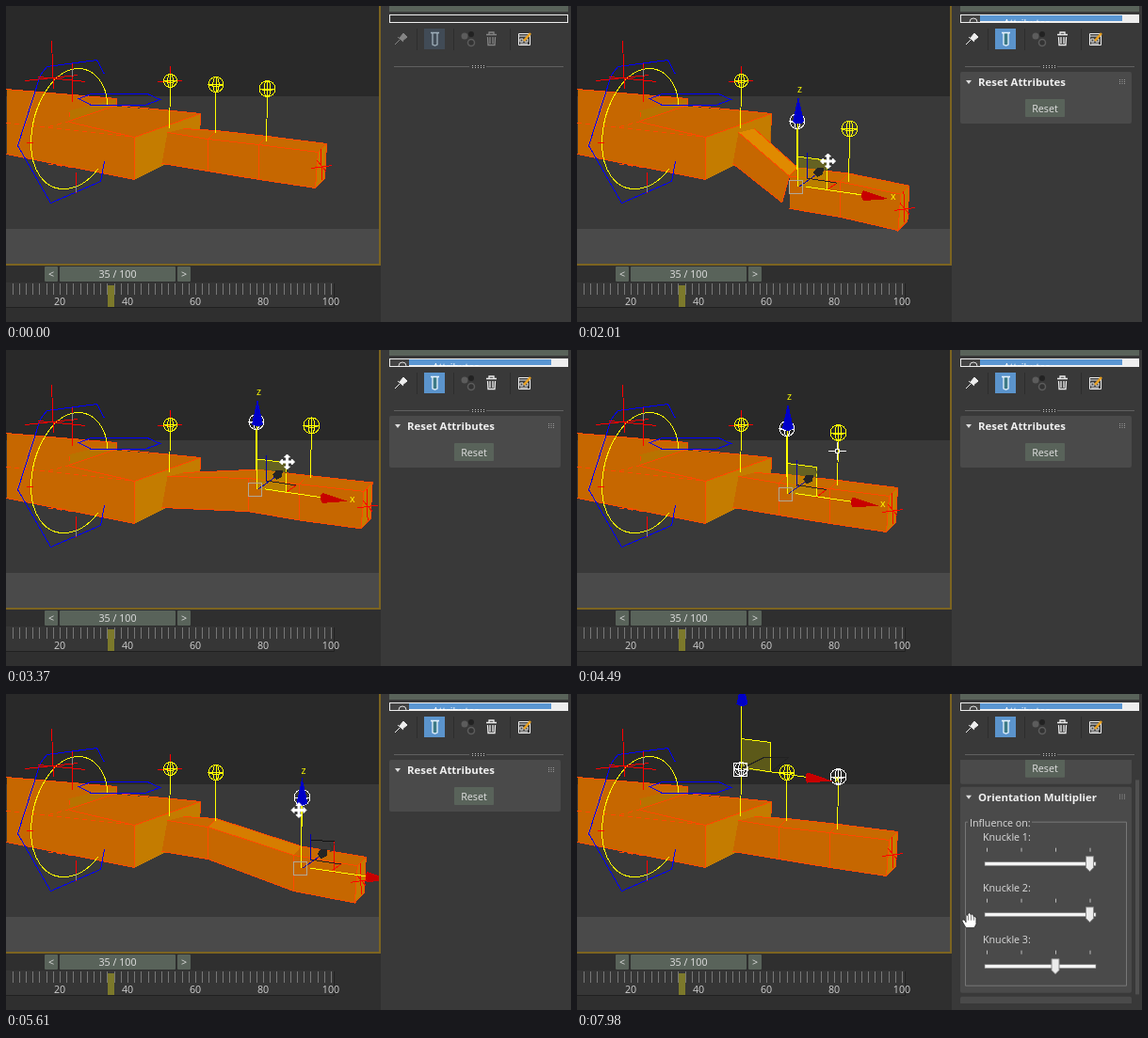
An HTML page that plays this animation: 600 px wide and 336 px high, repeating every 8 s.

```html
<!DOCTYPE html>
<html lang="en">
<head>
<meta charset="utf-8">
<title>Finger rig</title>
<style>
html, body { margin: 0; width: 100%; height: 100%; overflow: hidden; background: #393939; }
svg { display: block; width: 600px; height: 336px; font: 10.7px "Open Sans", "Noto Sans", sans-serif; }
svg svg { width: auto; height: auto; }
.title { font-size: 11.4px; font-weight: 700; fill: #f0f0f0; }
</style>
</head>
<body>
<svg id="stage" viewBox="0 0 600 336"></svg>
<script>
const LOOP = 8000, STEP = 40;
const YELLOW = '#ffff00', RED = '#ff0000', BLUE = '#0000ff', EDGE = '#ff4a00';
const FRONT = '#c66700', END = '#c47c00', BUTTON = '#59635a';

// Timing of selections and drags, in ms
const PICK2 = 1410, DRAG2 = 1890, UNDO2 = 3770, PICK3 = 4690, DRAG3 = 4810, UNDO3 = 6170, PICK1 = 6490, PAN = 7540;

// Keys: time, x, y
const move2 = [[DRAG2, 0, 0], [2010, 11, 39], [2130, 30, 72], [2290, 62, 34], [2450, 30, -12], [2610, -4, -22],
  [2730, -8, -27], [2850, 0, 12], [3010, 20, 46], [3210, 52, 18], [3370, 43, -7]];
const move3 = [[DRAG3, 0, 0], [4970, -20, 20], [5130, -15, 56], [5290, 30, 52], [5450, 38, 42], [5610, 37, 22],
  [5770, 22, 58], [5930, -18, 28], [6090, 4, -4]];
const pointer = [[250, 101, 274], [490, 190, 190], [730, 328, 172], [1010, 265, 112], [1290, 223, 84], [1450, 223, 84],
  [1850, 255, 126], [UNDO2, 296, 120], [4130, 285, 118], [4490, 276, 107], [4610, 277, 89], [PICK3, 277, 89],
  [4790, 274, 102], [UNDO3, 274, 102], [6450, 174, 79], [7180, 174, 79], [PAN, 417, 270], [7980, 417, 240]];

function at(keys, t) {
  if (t <= keys[0][0]) return keys[0].slice(1);
  for (let i = 1; i < keys.length; i++) {
    const [t0, x0, y0] = keys[i - 1], [t1, x1, y1] = keys[i];
    if (t <= t1) {
      const k = (t - t0) / (t1 - t0);
      return [x0 + (x1 - x0) * k, y0 + (y1 - y0) * k];
    }
  }
  return keys[keys.length - 1].slice(1);
}

const add = (a, b, k = 1) => [a[0] + b[0] * k, a[1] + b[1] * k];
// Parts moved to the right come nearer to the camera, so their heights grow.
const depthScale = dx => 1 + dx * .0008;
const shift = ([x, y], d) => [x + d[0], 83 + (y - 83) * depthScale(d[0]) + d[1]];
const rect = (x, y, w, h, fill, extra = '') => `<rect x="${x}" y="${y}" width="${w}" height="${h}" fill="${fill}" ${extra}/>`;
const frame = (x, y, w, h, stroke) => rect(x + .5, y + .5, w - 1, h - 1, 'none', `stroke="${stroke}"`);
const path = (d, stroke, fill = 'none', extra = '') => `<path d="${d}" fill="${fill}" stroke="${stroke}" ${extra}/>`;
const poly = (pts, fill, stroke = 'none') => path(`M${pts.join('L')}Z`, stroke, fill);
const text = (x, y, s, fill = '#dcdcdc', extra = '') => `<text x="${x}" y="${y}" fill="${fill}" ${extra}>${s}</text>`;
const centered = (x, y, s, fill) => text(x, y, s, fill, 'text-anchor="middle"');
const group = (x, y, body, extra = '') => `<g transform="translate(${x} ${y})" ${extra}>${body}</g>`;
const clip = (x, y, w, h, body) =>
  `<svg x="${x}" y="${y}" width="${w}" height="${h}" viewBox="${x} ${y} ${w} ${h}" style="width:${w}px;height:${h}px">${body}</svg>`;
const button = (x, y, w, h, label) => rect(x, y, w, h, BUTTON, 'rx="1"') + centered(x + w / 2, y + h / 2 + 4, label, '#e0e0e0');

const backdrop = rect(0, 0, 398, 96, '#292929') + rect(0, 96, 398, 141, '#393939') + rect(0, 237, 398, 38, '#4a4a4a');

const arm =
  poly([[0, 88], [117, 98], [117, 106], [206, 114], [205, 150], [136, 184], [0, 157]], FRONT) +
  poly([[66, 111], [117, 98], [117, 105], [66, 122]], '#b87300') +
  poly([[136, 139], [206, 114], [204, 151], [136, 184]], END) +
  path('M0 88L117 98V105L206 114L136 139L67 123M66 122L117 105M0 157L136 184V139M206 114V126', EDGE) +
  path('M0 124L136 139M45 128L67 122V110M45 168L70 171', EDGE, 'none', 'stroke-dasharray="5 4"');

const wristControls =
  path('M104 72L96 57L43 64L36 73L12 148L47 209L100 186L104 165', BLUE) +
  path('M77 98L90 93H150L163 99L147 105H90Z', BLUE) +
  path('M107 104C107 84 94 66 77 66C50 66 27 104 26 145C26 175 41 194 60 194C75 194 88 185 97 173', YELLOW) +
  path('M48 37L50 88M20 79L76 73M34 75L84 80M70 60V101M21 145H28M74 176V198', RED) +
  path('M70 66V74M74 190V197', '#888');

function timeline() {
  let s = rect(0, 276, 398, 60, '#2f2f2f') + rect(0, 294, 348, 27, '#363636') +
    button(41, 277, 14, 16, '&lt;') + button(57, 277, 123, 16, '35 / 100') + button(182, 277, 14, 16, '&gt;') +
    path('M0 320.5H348.5V295', '#202020');
  for (let n = 4; n <= 100; n += 2) {
    const x = Math.round(345 - (100 - n) * 3.6) + .5;
    s += path(`M${x} 295V307`, '#777');
  }
  for (let n = 20; n <= 100; n += 20) s += centered(345 - (100 - n) * 3.6, 318, n, '#d0d0d0');
  return s + rect(108, 297, 7, 23, '#7c792b');
}

function segment(a, b) {
  const slope = (b.front[1] - a.front[1]) / Math.max(20, b.front[0] - a.front[0]);
  const k = Math.max(0, Math.min(1, (slope - .18) * 4));
  const top = `rgb(${200 + 24 * k},${106 + 32 * k},0)`;
  const low = add(b.low, [-17, -14], Math.max(0, Math.min(.6, slope - .4)));
  return poly([a.front, a.back, b.back, b.front], top) + poly([a.front, b.front, low, a.low], FRONT) +
    path(`M${a.back}L${b.back}M${a.front}L${b.front}M${a.low}L${low}`, EDGE) +
    path(`M${low}L${b.front}L${b.back}`, EDGE);
}

function finger(d2, d3) {
  const total = add(d2, d3), end = add(total, total, .13);
  const section = (front, low, back, d) => ({ front: shift(front, d), low: shift(low, d), back: shift(back, d) });
  const s1 = section([171, 134], [165, 167], [188, 130], [0, 0]);
  const s2 = section([214, 141], [214, 175], [223, 132], d2);
  const s3 = section([268, 147], [268, 184], [277, 138], total);
  const tip = section([331, 155], [328, 193], [340, 146], end);
  const corner = shift([338, 183], end), [x, y] = shift([334, 169], end);
  return segment(s1, s2) + segment(s2, s3) + segment(s3, tip) +
    poly([tip.front, tip.back, corner, tip.low], END, EDGE) +
    path(`M${x - 10} ${y + 3}L${x + 12} ${y}M${x} ${y - 17}L${x + 1} ${y + 16}M${x - 4} ${y - 5}L${x + 6} ${y + 7}`, RED);
}

function handle([x, y], r, stem, color) {
  return path(`M${x} ${y + r}L${x - 1} ${y + stem}`, YELLOW) +
    group(x, y, `<g fill="none" stroke="${color}"><circle r="${r}"/><ellipse rx="${r * .4}" ry="${r}"/>
      <path d="M${-r} 0Q0 4 ${r} 0M${-r} 0H${r}M0 ${-r}V${r}"/></g>`);
}

function gizmo([x, y], planeActive, flat) {
  const plane = planeActive
    ? path('M0 -32L31 -28V4L0 0Z', 'none', '#a8a000', 'fill-opacity=".4"') + path('M0 -32L31 -28V4', YELLOW)
    : path('M9 -30L35 -28', '#111') + path('M35 -28V5', RED);
  const depth = flat ? path('M0 0L24 -12H50L31 4', '#222')
    : path('M2 0L23 -15M10 -8V-36', '#0000b0') + path('M31 4L42 -4', RED) + path('M42 -4L10 -9', '#222') +
      path('M17 -15L21 -20L28 -20L27 -13L21 -10Z', 'none', '#252525') + text(30, -20, 'y', '#353525');
  return group(x, y, plane + depth +
    path('M0 0V-70M9 0L70 9', YELLOW) +
    path('M-5 -69L1 -96L7 -69Q1 -64 -5 -69Z', 'none', '#0000c8') +
    path('M70 4L97 13L70 15Q66 9 70 4Z', 'none', '#c80000') +
    frame(-9, -7, 15, 15, flat ? '#fff' : '#b0a898') +
    text(0, -100, 'z', YELLOW) + text(99, 14, 'x', YELLOW));
}

function cursor([x, y], kind) {
  const shapes = {
    arrow: path('M0 0V14L3 11L6 17L8 16L6 10H10Z', '#222', '#fff'),
    cross: path('M-9 .5H-2M3 .5H10M.5 -9V-2M.5 3V10M-1.5 -1.5H2.5V2.5H-1.5Z', '#fff'),
    move: path('M-8 0L-5 -3V-1H-1V-5H-3L0 -8L3 -5H1V-1H5V-3L8 0L5 3V1H1V5H3L0 8L-3 5H-1V1H-5V3Z', '#fff', '#fff'),
    hand: path('M-4 8L-8 1Q-8 -2 -5 0L-4 2V-5Q-3 -7 -2 -5V-7Q0 -9 1 -7V-6Q3 -8 4 -5V-4Q7 -5 7 -2V4L5 8Z', '#333', '#fff') +
      path('M-1.5 -5V0M1.5 -6V0M4.5 -4V0', '#888')
  };
  return group(x, y, shapes[kind]);
}

function toolbar(active) {
  const ink = active ? '#eee' : '#858585';
  return rect(407, 0, 190, 6, BUTTON) + rect(407, 9, 190, 9, active ? '#eee' : '#343434') + frame(407, 9, 190, 9, '#eee') +
    (active ? rect(408, 10, 20, 7, '#444') + rect(428, 10, 151, 6, '#5a96d2') +
      clip(408, 10, 171, 7, text(453, 22, 'Attributes', '#fff') +
        '<circle cx="421" cy="17" r="4" fill="none" stroke="#ddd"/>') : '') +
    path('M436.5 24V47M475.5 24V47M535.5 24V47', '#2d2d2d') +
    rect(444, 24, 22, 22, active ? '#5b94cc' : '#414b56') +
    path('M413 41L418 36M416 33L422 38M418 34L422 29L426 33L421 37Z', ink, ink) +
    path('M451 28.5H460M453 29V41Q455.5 43 458 41V29', active ? '#e8f4ff' : '#a0b0bc', active ? '#3c7a86' : 'none', 'stroke-width="1.3"') +
    `<circle cx="487" cy="32" r="3.5" fill="#5c5c5c"/><circle cx="494" cy="30" r="3" fill="#222"/><circle cx="494" cy="39" r="3.5" fill="#333" stroke="#5c5c5c" stroke-width="1.5"/>` +
    path('M510 30.5H521M513 30V28H518V30M511.5 33L512 41.5H519L519.5 33M514 33V40M517 33V40', ink, 'none', 'stroke-width="1.3"') +
    path('M544.5 29.5H556.5V41.5H544.5ZM544 32H557', '#eee') +
    path('M546 35H549V38H546ZM551 35H554V38H551ZM546 40H554', '#eee') +
    path('M550 37L557 29', '#e8a020', 'none', 'stroke-width="2.5"') +
    path('M412 64.5H492M510 64.5H592', '#606060') + path('M495 63.5H508M495 65.5H508', '#bbb', 'none', 'stroke-dasharray="1 2"');
}

function rollout(y, h, title, body = '') {
  return group(407, y, rect(0, 0, 182, h, '#4a4a4a', 'rx="2"') + path('M6 9H12L9 13Z', 'none', '#ddd') +
    text(19, 15, title, '#f0f0f0', 'class="title"') +
    path('M169 8.5H175M169 10.5H175M169 12.5H175', '#999', 'none', 'stroke-dasharray="1 1.5"') + body);
}

function slider(n, y, value) {
  const x = 28 + value * 36.5;
  const ticks = [0, 1, 2, 3].map(i => `M${28.5 + i * 36.5} ${y + 8}V${y + 12}`).join('');
  return text(24, y, `Knuckle ${n}:`) + path(ticks, '#bbb') +
    rect(26, y + 23, 118, 4, '#f4f4f4', 'stroke="#777" stroke-width=".6"') +
    path(`M${x - 4} ${y + 17}H${x + 4}V${y + 29}L${x} ${y + 33}L${x - 4} ${y + 29}Z`, '#888', '#ececec');
}

function panel(t) {
  let body = '';
  if (t >= PICK2) body += rollout(70, 55, 'Reset Attributes', button(69, 29, 42, 19, 'Reset'));
  if (t >= PICK1) {
    body += rollout(128, 219, 'Orientation Multiplier',
      path('M8 37.5H5.5V211.5H176.5V37.5H76', '#777') + text(10, 42, 'Influence on:') +
      slider(1, 57, 3) + slider(2, 111, 3) + slider(3, 166, 2)) + rollout(351, 60, '');
  }
  const scroll = t >= PAN ? 270 - at(pointer, t)[1] : 0;
  return rect(399, 0, 201, 336, '#393939') + toolbar(t >= PICK2) +
    clip(399, 70, 201, 259, group(0, -scroll, body)) +
    (t >= PICK1 ? rect(593, 70 + scroll * .73, 4, 228, '#505050') : '');
}

function pointerState(t, j2, j3) {
  if (t >= DRAG2 && t < UNDO2) return [add(j2, [33, 43]), 'move'];
  if (t >= DRAG3 && t < UNDO3) return [add(j3, [-3, 14]), 'move'];
  const p = at(pointer, t);
  if (t >= PAN) return [p, 'hand'];
  const over = (t >= 1250 && t < 1530) || (t >= 4450 && t < 4730) || (t >= 6410 && t < 7220);
  const onGizmo = (t >= 1770 && t < DRAG2) || (t >= 4730 && t < DRAG3);
  return [p, over ? 'cross' : onGizmo ? 'move' : 'arrow'];
}

function draw(t) {
  const d2 = t < UNDO2 ? at(move2, t) : [0, 0];
  const d3 = t < UNDO3 ? at(move3, t) : [0, 0];
  const j1 = [174, 79], j2 = add([222.5, 83], d2), j3 = add(add([277, 87.5], d2, 1.09), d3);
  const picked = t < PICK2 ? 0 : t < PICK3 ? 2 : t < PICK1 ? 3 : 1;
  const color = n => picked === n || (picked === 1 && n === 3) ? '#fff' : YELLOW;
  let scene = arm + finger(d2, d3) + wristControls;
  if (picked !== 1) scene += path('M161 80L187 79M174 63V97', RED);
  scene += handle(j1, 7, 51, color(1)) + handle(j2, 8, 53, color(2)) + handle(j3, 8.5, 56, color(3));
  if (picked === 2) scene += gizmo(add(j2, [0, 69 * depthScale(d2[0])]), true);
  if (picked === 3) scene += gizmo(add(j3, [-1, 75]), false);
  if (picked === 1) scene += gizmo(j1, true, true);
  const view = `<g shape-rendering="crispEdges">${backdrop}${group(.5, .5, scene)}</g>`;
  let out = clip(0, 0, 398, 276, view) +
    timeline() + panel(t) + path('M0 275H397V0', '#7c6420', 'none', 'stroke-width="2"');
  if (t >= 250) out += cursor(...pointerState(t, j2, j3));
  stage.innerHTML = out;
}

const stage = document.getElementById('stage');
const start = performance.now();
let shown = -1;
function tick() {
  const now = (performance.now() - start) % LOOP;
  const t = Math.max(0, Math.floor((now - 10) / STEP) * STEP + 10);
  if (t !== shown) draw(shown = t);
  requestAnimationFrame(tick);
}
draw(0);
requestAnimationFrame(tick);
</script>
</body>
</html>
```
